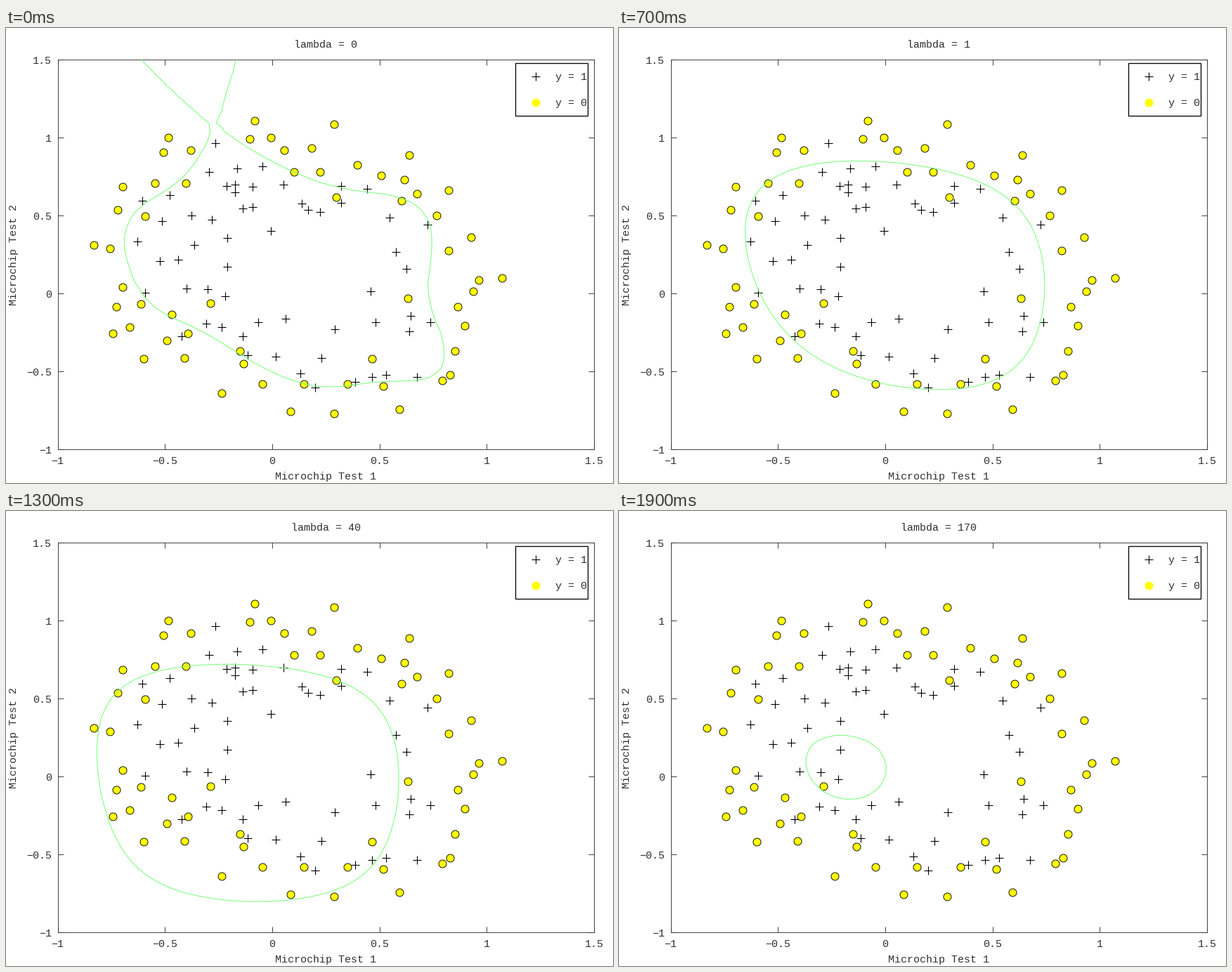
Animation of 864 by 648 pixels, one loop 2000 ms. Source, as a matplotlib script:

```python
import numpy as np
import matplotlib.pyplot as plt
from matplotlib.animation import FuncAnimation
from matplotlib.collections import LineCollection

W, H = 864, 648
BOX = (73.5, 45.2, 837, 600.2)  # left, top, right, bottom in pixels
INK = "#303030"
LAMBDAS = [0, 1e-6, 1e-5, 1e-4, 1e-3, 0.01, 0.1, 1, 2, 4, 8, 10,
           20, 40, 80, 100, 120, 140, 160, 170]

ACCEPTED = np.array([
    .051267, .69956, -.092742, .68494, -.21371, .69225, -.375, .50219,
    -.51325, .46564, -.52477, .2098, -.39804, .034357, -.30588, -.19225,
    .016705, -.40424, .13191, -.51389, .38537, -.56506, .52938, -.5212,
    .63882, -.24342, .73675, -.18494, .54666, .48757, .322, .5826,
    .16647, .53874, -.046659, .81652, -.17339, .69956, -.47869, .63377,
    -.60541, .59722, -.62846, .33406, -.59389, .005117, -.42108, -.27266,
    -.11578, -.39693, .20104, -.60161, .46601, -.53582, .67339, -.53582,
    -.13882, .54605, -.29435, .77997, -.26555, .96272, -.16187, .8019,
    -.17339, .64839, -.28283, .47295, -.36348, .31213, -.30012, .027047,
    -.23675, -.21418, -.06394, -.18494, .062788, -.16301, .22984, -.41155,
    .2932, -.2288, .48329, -.18494, .64459, -.14108, .46025, .012427,
    .6273, .15863, .57546, .26827, .72523, .44371, .22408, .52412,
    .44297, .67032, .322, .69225, .13767, .57529, -.0063364, .39985,
    -.092742, .55336, -.20795, .35599, -.20795, .17325, -.43836, .21711,
    -.21947, -.016813, -.13882, -.27266]).reshape(-1, 2)

REJECTED = np.array([
    .18376, .93348, .22408, .77997, .29896, .61915, .50634, .75804,
    .61578, .7288, .60426, .59722, .76555, .50219, .92684, .3633,
    .82316, .27558, .96141, .085526, .93836, .012427, .86348, -.082602,
    .89804, -.20687, .85196, -.36769, .82892, -.5212, .79435, -.55775,
    .59274, -.7405, .51786, -.5943, .46601, -.41886, .35081, -.57968,
    .28744, -.76974, .085829, -.75512, .14919, -.57968, -.13306, -.4481,
    -.40956, -.41155, -.39228, -.25804, -.74366, -.25804, -.69758, .041667,
    -.75518, .2902, -.69758, .68494, -.4038, .70687, -.38076, .91886,
    -.50749, .90424, -.54781, .70687, .10311, .77997, .057028, .91886,
    -.10426, .99196, -.081221, 1.1089, .28744, 1.087, .39689, .82383,
    .63882, .88962, .82316, .66301, .67339, .64108, 1.0709, .10015,
    -.046659, -.57968, -.23675, -.63816, -.15035, -.36769, -.49021, -.3019,
    -.46717, -.13377, -.28859, -.060673, -.61118, -.067982, -.66302, -.21418,
    -.59965, -.41886, -.72638, -.082602, -.83007, .31213, -.72062, .53874,
    -.59389, .49488, -.48445, .99927, -.0063364, .99927, .63265, -.030612,
]).reshape(-1, 2)


def features(u, v):
    """All monomials of u and v up to degree six."""
    return np.stack([u ** (i - j) * v ** j
                     for i in range(7) for j in range(i + 1)], axis=-1)


X = features(*np.vstack([ACCEPTED, REJECTED]).T)
Y = np.r_[np.ones(len(ACCEPTED)), np.zeros(len(REJECTED))]


def cost(theta, lam):
    z = X @ theta
    pen = np.r_[0, theta[1:]] * lam / len(Y)
    value = np.mean(np.logaddexp(0, z) - Y * z) + pen @ theta / 2
    grad = X.T @ (0.5 + 0.5 * np.tanh(z / 2) - Y) / len(Y) + pen
    return value, grad


def dogleg(B, g, delta):
    newton = -np.linalg.solve(B, g)
    if np.linalg.norm(newton) <= delta:
        return newton
    gn = np.linalg.norm(g)
    cauchy = -g * (gn ** 2 / (g @ B @ g))
    if np.linalg.norm(cauchy) >= delta:
        return -g * delta / gn
    d = newton - cauchy
    a, b, c = d @ d, cauchy @ d, cauchy @ cauchy - delta ** 2
    return cauchy + d * (np.sqrt(b * b - a * c) - b) / a


def bfgs(B, s, y):
    """Damped BFGS update, reset when it loses definiteness."""
    Bs = B @ s
    sBs = s @ Bs
    t = 0.8 / max(1 - y @ s / sBs, 0.8)
    r = t * y + (1 - t) * Bs
    B = B + np.outer(r, r) / (s @ r) - np.outer(Bs, Bs) / sBs
    try:
        np.linalg.cholesky(B)
        return B
    except np.linalg.LinAlgError:
        return np.eye(len(s))


def fit(lam, max_iter=400, tol=1e-7):
    """Regularised logistic regression by a trust-region quasi-Newton search."""
    x = np.zeros(X.shape[1])
    f, g = cost(x, lam)
    B, delta, last, shrink = np.eye(len(x)), 0.1, 0, 0.5
    for k in range(max_iter):
        s = dogleg(B, g, delta)
        sn = np.linalg.norm(s)
        if k == 0:
            delta = min(delta, sn)
        f1, g1 = cost(x + s, lam)
        actual = (f - f1) / (abs(f1) + abs(f)) if f1 < f else -1
        t = s @ B @ s / 2 + g @ s
        ratio = actual * (abs(f) + abs(f + t)) / -t if t < 0 else 0
        if ratio < min(max(0.1, 0.8 * last), 0.9):
            delta *= shrink
            shrink **= 1.4142
            if delta <= 1e-15 * np.linalg.norm(x):
                break
        else:
            last, shrink = ratio, 0.5
            if abs(1 - ratio) <= 0.1:
                delta = 1.4142 * sn
            elif ratio >= 0.5:
                delta = max(delta, 1.4142 * sn)
        if ratio >= 1e-4:
            x = x + s
            B = bfgs(B, s, g1 - g)
            f, g = f1, g1
        if sn <= tol * np.linalg.norm(x) or actual < tol:
            break
    return x


fig = plt.figure(figsize=(W / 72, H / 72), dpi=72, facecolor="white")
left, top, right, bottom = BOX
ax = fig.add_axes([left / W, 1 - bottom / H,
                   (right - left) / W, (bottom - top) / H])
ax.set(xlim=(-1, 1.5), ylim=(-1, 1.5))


def label(x, y, text, ha="center", **kw):
    return fig.text(x / W, 1 - y / H, text, ha=ha, va="baseline", size=15,
                    family="Liberation Mono", color=INK, **kw)


ticks = np.arange(-1, 1.6, 0.5)
ax.set_xticks(ticks)
ax.set_yticks(ticks)
ax.tick_params(direction="in", length=8, width=0.9, color=INK, top=True,
               right=True, labelbottom=False, labelleft=False)
for spine in ax.spines.values():
    spine.set(linewidth=0.9, color=INK)
for t in ticks:
    name = f"{t:g}".replace("-", "\u2212")
    share = (t + 1) / 2.5
    label(left + share * (right - left), 621, name)
    label(65, bottom - share * (bottom - top) + 5.5, name, ha="right")
title = label(455, 28, "")
label(455, 643, "Microchip Test 1")
label(18, 323, "Microchip Test 2", rotation=90).set_va("center")
fig.texts[-1].set(ha="right")

plus = dict(ls="", marker="+", ms=12, mew=1.1, color="black")
disc = dict(ls="", marker="o", ms=11, mew=0.9, mfc="#ffff00")
ax.plot(*ACCEPTED.T, **plus)
ax.plot(*REJECTED.T, mec="black", **disc)

# Legend, placed in pixels
key = fig.add_axes([0, 0, 1, 1])
key.set(xlim=(0, W), ylim=(H, 0))
key.axis("off")
key.add_patch(plt.Rectangle((724.5, 50), 103.5, 75, fc="white",
                            ec="black", lw=1.3))
key.plot(754, 69, **plus)
key.plot(754, 106, mec="#ffff00", **disc)
label(782, 74, "y = 1", ha="left")
label(782, 111, "y = 0", ha="left")

axis = np.linspace(-1, 1.5, 50)
grid = features(*np.meshgrid(axis, axis))


def boundary(lam):
    cs = ax.contour(axis, axis, grid @ fit(lam), levels=[0])
    segs = cs.allsegs[0]
    cs.remove()
    return segs


curves = [boundary(lam) for lam in LAMBDAS]
line = ax.add_collection(LineCollection([], colors="#80ff80", linewidths=1.1,
                                        zorder=4), autolim=False)


def draw(i):
    title.set_text(f"lambda = {LAMBDAS[i]:g}")
    line.set_segments(curves[i])
    return title, line


anim = FuncAnimation(fig, draw, frames=len(LAMBDAS), interval=100,
                     init_func=lambda: draw(0), repeat=True, blit=False)
plt.show()
```
